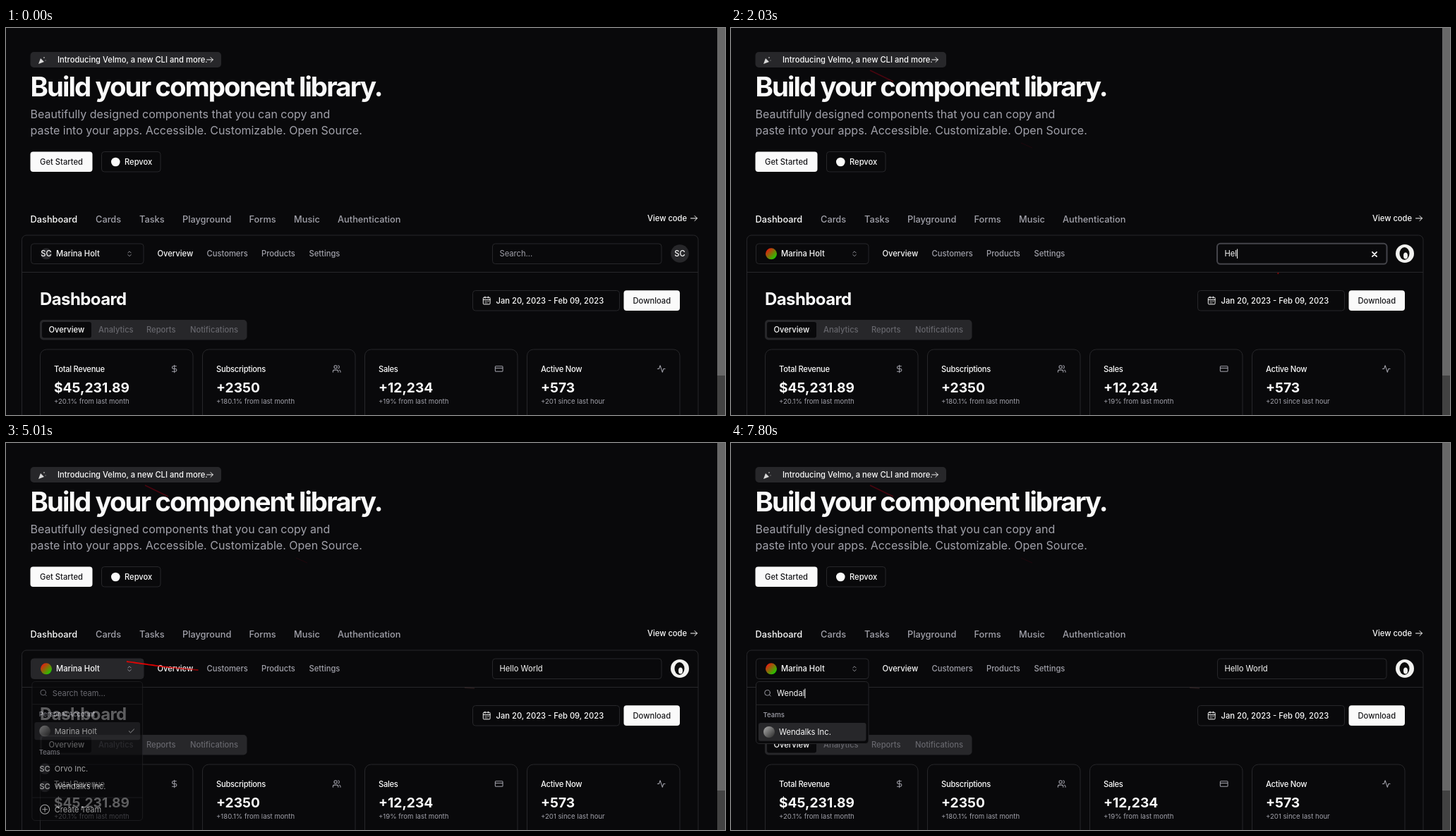
An HTML page for the animation above (8 s loop, 1019 px wide and 549 px high).

```html
<!DOCTYPE html>
<html lang="en">
<head>
<meta charset="utf-8">
<title>Component library</title>
</head>
<body bgcolor="#09090b" topmargin="0" leftmargin="0" rightmargin="0" bottommargin="0" marginwidth="0" marginheight="0">
<svg xmlns="http://www.w3.org/2000/svg" width="1019" height="549" viewBox="0 0 1019 549" display="block" overflow="hidden" font-family="Inter, sans-serif">
  <defs>
    <linearGradient id="vivid" x1=".15" y1=".15" x2=".85" y2=".85">
      <stop stop-color="#e02010"/><stop offset="1" stop-color="#20c800"/>
    </linearGradient>
    <linearGradient id="gray" x1=".15" y1=".15" x2=".85" y2=".85">
      <stop stop-color="#9a9a9a"/><stop offset="1" stop-color="#3c3c3c"/>
    </linearGradient>
  </defs>
  <g id="fixed"></g>
  <g id="live"></g>
</svg>
<script>
const LOOP = 8000, TRAIL_LIFE = 500;
const BG = '#09090b', LINE = '#27272a', FG = '#fafafa', MUTED = '#a1a1aa', DIM = '#66666c', DARK = '#18181b';
const ruler = document.createElement('canvas').getContext('2d');

const ICONS = {
  dollar: 'M12 2v20M17 5H9.5a3.5 3.5 0 0 0 0 7h5a3.5 3.5 0 0 1 0 7H6',
  users: 'M16 21v-2a4 4 0 0 0-4-4H6a4 4 0 0 0-4 4v2M13 7a4 4 0 1 1-8 0a4 4 0 0 1 8 0M22 21v-2a4 4 0 0 0-3-3.87M16 3.13a4 4 0 0 1 0 7.75',
  card: 'M4 5h16a2 2 0 0 1 2 2v10a2 2 0 0 1-2 2H4a2 2 0 0 1-2-2V7a2 2 0 0 1 2-2M2 10h20',
  activity: 'M22 12h-4l-3 9L9 3l-3 9H2',
  calendar: 'M5 4h14a2 2 0 0 1 2 2v14a2 2 0 0 1-2 2H5a2 2 0 0 1-2-2V6a2 2 0 0 1 2-2M16 2v4M8 2v4M3 10h18M8 14h1M12 14h1M16 14h1M8 18h1M12 18h1',
  search: 'M19 11a8 8 0 1 1-16 0a8 8 0 0 1 16 0M21 21l-4.3-4.3',
  plus: 'M22 12a10 10 0 1 1-20 0a10 10 0 0 1 20 0M7 12h10M12 7v10',
  updown: 'M7 15l5 5 5-5M7 9l5-5 5 5',
  check: 'M20 6L9 17l-5-5',
  arrow: 'M3 12h18M14 5l7 7-7 7',
  close: 'M5 5l14 14M19 5L5 19'
};

// y is the middle of the capital letters
const text = (str, x, y, { size = 11.2, weight = 500, color = FG, track = 0, anchor = 'start' } = {}) =>
  `<text x="${x}" y="${y + size * 0.364}" font-size="${size}" font-weight="${weight}" fill="${color}" letter-spacing="${track * size}" text-anchor="${anchor}">${str}</text>`;

const box = (x, y, w, h, r, { fill = 'none', stroke = 'none', width = 1 } = {}) =>
  `<rect x="${x}" y="${y}" width="${w}" height="${h}" rx="${r}" fill="${fill}" stroke="${stroke}" stroke-width="${width}"/>`;

const circle = (x, y, r, fill) => `<circle cx="${x}" cy="${y}" r="${r}" fill="${fill}"/>`;

const line = (x1, y1, x2, y2, color, width = 1, alpha = 1) =>
  `<line x1="${x1}" y1="${y1}" x2="${x2}" y2="${y2}" stroke="${color}" stroke-width="${width}" opacity="${alpha}"/>`;

const icon = (name, x, y, size, color, width = 2) =>
  `<path d="${ICONS[name]}" transform="translate(${x - size / 2} ${y - size / 2}) scale(${size / 24})" fill="none" stroke="${color}" stroke-width="${width}" stroke-linecap="round" stroke-linejoin="round"/>`;

const initials = (x, y, r) => circle(x, y, r, LINE) + text('SC', x, y, { anchor: 'middle' });

const portrait = (x, y) => circle(x, y, 13, '#f2f2f0') +
  `<ellipse cx="${x - 0.5}" cy="${y}" rx="7" ry="9" fill="#0c0c0c"/>` +
  `<ellipse cx="${x + 1}" cy="${y + 3}" rx="3" ry="4.5" fill="#f2f2f0"/>`;

function textWidth(str) {
  ruler.font = '400 11.2px Inter, sans-serif';
  return ruler.measureText(str).width;
}

// Pointer path: time, x, y
const PATH = [
  [80, 75, 0], [440, 200, 62], [720, 420, 166], [890, 576, 234], [1250, 770, 313],
  [1350, 784, 327], [1430, 784, 327], [1540, 775, 349], [3600, 761, 355], [3740, 750, 349],
  [3930, 650, 347], [3970, 621, 345], [4250, 356, 329], [4470, 293, 324], [4600, 228, 318],
  [4860, 171, 310], [5030, 171, 310], [5190, 197, 296], [5250, 197, 286]
];
const REST = [1540, 3600];

function pointer(t) {
  if (t > REST[0] && t < REST[1]) t = REST[0];
  const i = PATH.findIndex(p => p[0] >= t);
  if (i <= 0) return PATH.at(i).slice(1);
  const [t0, x0, y0] = PATH[i - 1], [t1, x1, y1] = PATH[i];
  const k = (t - t0) / (t1 - t0);
  return [x0 + (x1 - x0) * k, y0 + (y1 - y0) * k];
}

function trail(t) {
  const step = 10;
  let out = '';
  for (let age = 0; age < TRAIL_LIFE; age += step) {
    const end = t - age, start = end - step;
    if (start < REST[1] && end >= REST[1]) continue;
    const [x1, y1] = pointer(start), [x2, y2] = pointer(end);
    if (x1 === x2 && y1 === y2) continue;
    out += line(x1, y1, x2, y2, '#f00', 1.8, 0.5 + 0.45 * Math.sin(Math.PI * age / TRAIL_LIFE));
  }
  // faint streaks left behind on the screen
  if (t > 950) out += line(197, 60, 230, 76, '#960014', 1.5, 0.45) + line(411, 163, 427, 170, '#780014', 1, 0.2);
  if (t > 4430) out += line(650, 347, 664, 348, '#5a3c3c', 2, 0.3);
  return out;
}

const typed = (str, times, t) => str.slice(0, times.filter(at => t >= at).length);
const SEARCH_KEYS = [1600, 1730, 1970, 2170, 2310, 2440, 2750, 2980, 3150, 3320, 3460];
const TEAM_KEYS = [6160, 6330, 6760, 7100, 7440, 7800];
const OWNER = 'Marina Holt', TEAM_A = 'Orvo Inc.', TEAM_B = 'Wendalks Inc.';

function hero() {
  const lead = { size: 16, weight: 400, color: MUTED };
  const tabs = { Dashboard: 34.5, Cards: 127, Tasks: 189, Playground: 250, Forms: 344.5, Music: 408, Authentication: 470 };
  return box(34.5, 34, 270.5, 22, 5, { fill: LINE }) +
    '<path d="M46 51l3-8 5 5z" fill="#d8d8d8"/>' +
    circle(54, 42, 0.9, '#aaa') + circle(56, 46, 0.7, '#888') +
    text('Introducing Velmo, a new CLI and more.', 73, 45) +
    icon('arrow', 289, 45, 11.5, FG) +
    text('Build your component library.', 34.5, 83.3, { size: 38.4, weight: 700, track: -0.05 }) +
    text('Beautifully designed components that you can copy and', 34.5, 122.5, lead) +
    text('paste into your apps. Accessible. Customizable. Open Source.', 34.5, 145, lead) +
    box(34.5, 175.5, 88, 28.5, 4, { fill: FG }) +
    text('Get Started', 78.5, 190, { color: DARK, anchor: 'middle' }) +
    box(135.5, 175.5, 83.5, 28.5, 4, { stroke: LINE }) +
    circle(155.3, 190, 6.3, FG) +
    text('Repvox', 168, 190) +
    Object.keys(tabs).map(name =>
      text(name, tabs[name], 271.7, { size: 12.8, color: name === 'Dashboard' ? FG : MUTED })).join('') +
    text('View code', 909, 270) +
    icon('arrow', 975, 270, 12, FG);
}

function dashboard() {
  const tabs = { Overview: 60.5, Analytics: 131, Reports: 199, Notifications: 261 };
  const cards = [
    ['Total Revenue', '$45,231.89', '+20.1% from last month', 'dollar'],
    ['Subscriptions', '+2350', '+180.1% from last month', 'users'],
    ['Sales', '+12,234', '+19% from last month', 'card'],
    ['Active Now', '+573', '+201 since last hour', 'activity']
  ];
  return box(22.5, 294, 958.5, 300, 6.5, { stroke: LINE }) +
    line(22, 346.5, 981, 346.5, LINE) +
    text('Dashboard', 48, 384, { size: 24, weight: 700, track: -0.025 }) +
    box(661.5, 372.5, 208, 28.5, 4, { stroke: LINE }) +
    icon('calendar', 681.2, 386.5, 13, FG, 1.8) +
    text('Jan 20, 2023 - Feb 09, 2023', 694.5, 386.7) +
    box(875.5, 372.3, 79.5, 28.7, 4, { fill: FG }) +
    text('Download', 915.3, 386.7, { color: DARK, anchor: 'middle' }) +
    box(48, 414, 293.5, 28.5, 5, { fill: LINE }) +
    box(51, 417, 70, 22.5, 3, { fill: BG }) +
    Object.keys(tabs).map(name =>
      text(name, tabs[name], 428.3, { color: name === 'Overview' ? FG : DIM })).join('') +
    cards.map(([title, value, note, glyph], i) => {
      const x = 48.5 + i * 230;
      return box(x, 456, 216.5, 120, 9, { stroke: LINE }) +
        text(title, x + 19.5, 483.5, { track: -0.025 }) +
        icon(glyph, x + 190.2, 483.5, 12.8, MUTED) +
        text(value, x + 19.5, 510.3, { size: 19.2, weight: 700 }) +
        text(note, x + 19.5, 530, { size: 9.6, weight: 400, color: MUTED });
    }).join('');
}

const scrollbar = () => box(1008, 0, 11, 549, 0, { fill: '#424242' }) + box(1008, 0, 11, 493, 0, { fill: '#686868' });

function toolbar(t) {
  const [mx, my] = pointer(t);
  const over = (x, y, w, h) => mx > x && mx < x + w && my > y && my < y + h;
  const loaded = t >= 180, focused = t > 1300 && t < 4900;
  const links = { Overview: 214.5, Customers: 284.5, Products: 362, Settings: 429.5 };
  const value = typed('Hello World', SEARCH_KEYS, t);
  let out = box(35.5, 306, 159.5, 28.5, 4, { stroke: LINE, fill: over(35, 306, 160, 29) ? LINE : BG }) +
    (loaded ? circle(57, 320.3, 8, 'url(#vivid)') : initials(57, 320.3, 8)) +
    text(OWNER, 71, 320.3) +
    icon('updown', 175, 320.3, 10.5, MUTED);
  for (const name in links) {
    const lit = name === 'Overview' || over(links[name], 312, 58, 16);
    out += text(name, links[name], 320.3, { color: lit ? FG : MUTED });
  }
  out += focused
    ? box(689, 305.8, 240.5, 29, 4.5, { stroke: '#44444a', width: 2 })
    : box(689.5, 306, 239.5, 28.5, 4, { stroke: LINE });
  out += text(value || 'Search...', 699.5, 320.3, { weight: 400, color: value ? FG : MUTED });
  if (focused) {
    const caret = 700 + textWidth(value);
    if (t < 3960) out += line(caret, 313.5, caret, 327, FG);
    if (value) out += icon('close', 912, 321, 10.5, FG, 4);
  }
  return out + (loaded ? portrait(955, 320) : initials(955, 320, 12.8));
}

function teamMenu(t) {
  const opening = Math.min(1, (t - 4930) / 125);
  if (opening <= 0) return '';
  const query = typed(TEAM_B.slice(0, 6), TEAM_KEYS, t);
  const bottom = [539, 452][query.length] || 426.5;
  const small = { size: 9.6, color: MUTED };
  const row = (name, y, loaded = true) =>
    (loaded ? circle(54, y, 8, 'url(#gray)') : initials(54, y, 8)) + text(name, 68, y, { weight: 400 });
  const highlight = box(39, 397, 152.5, 25.7, 3, { fill: LINE });

  let out = box(35.5, 338.5, 159.5, bottom - 338.5, 4.5, { fill: BG, stroke: LINE }) +
    line(36, 371.3, 195, 371.3, LINE) +
    icon('search', 52, 354.8, 11.5, MUTED) +
    text(query || 'Search team...', 65, 355.3, { weight: 400, color: query ? FG : MUTED });
  if (query) {
    const caret = 65.5 + textWidth(query);
    out += line(caret, 348.5, caret, 362, FG) +
      (query.length > 2 ? highlight : '') +
      text('Teams', 45.5, 385.5, small) +
      row(TEAM_B, 410) +
      (query.length === 1 ? row(TEAM_A, 436) : '');
  } else {
    const loaded = t > 5100;
    out += text('Personal Account', 45.5, 385.5, small) +
      highlight + row(OWNER, 410) + icon('check', 179, 410, 11, FG) +
      text('Teams', 45.5, 440, small) +
      row(TEAM_A, 464.3, loaded) + row(TEAM_B, 490, loaded) +
      line(36, 506, 195, 506, LINE) +
      icon('plus', 54, 523, 16, FG, 1.6) +
      text('Create Team', 68, 523, { weight: 400 });
  }
  const scale = 0.95 + 0.05 * opening;
  return `<g opacity="${opening}" transform="translate(115.3 338) scale(${scale}) translate(-115.3 -338)">${out}</g>`;
}

const live = document.getElementById('live');
document.getElementById('fixed').innerHTML = hero() + dashboard() + scrollbar();

function tick() {
  const t = performance.now() % LOOP;
  live.innerHTML = toolbar(t) + teamMenu(t) + trail(t);
  requestAnimationFrame(tick);
}
tick();
</script>
</body>
</html>
```
